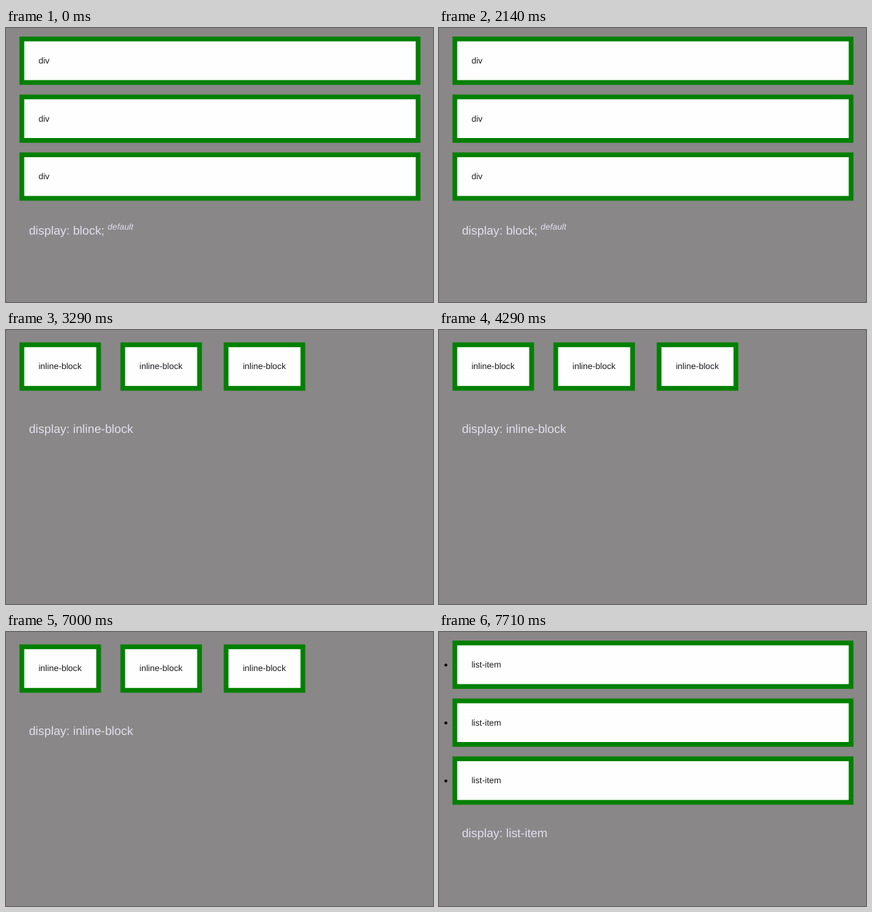
These frames come from a looping animation (600x386 px, 8000 ms). An HTML page:

```html
<!DOCTYPE html>
<html lang="en">
<head>
<meta charset="utf-8">
<title>CSS display values</title>
<style>
  html, body { margin: 0; width: 100%; height: 100%; overflow: hidden; background: #8a8788; }
  svg { display: block; width: 600px; height: 386px; }
  text {
    font: 12.1px "Liberation Sans", Arial, sans-serif;
    fill: #1c1c1e;
    text-rendering: geometricPrecision;
  }
  .box { fill: #fffeff; stroke: #008000; stroke-width: 6.7px; }
  .label { font-size: 16.9px; fill: #e3dfee; }
  .sup { font-size: 12px; font-style: italic; fill: #e3dfee; }

  .scene { visibility: hidden; animation: 8s step-end infinite; }
  #block { animation-name: block; }
  #inline { animation-name: inline; }
  #list { animation-name: list; }
  @keyframes block { 0% { visibility: visible } 30.375%, 100% { visibility: hidden } }
  @keyframes inline { 0% { visibility: hidden } 30.375% { visibility: visible } 91.125%, 100% { visibility: hidden } }
  @keyframes list { 0% { visibility: hidden } 91.125%, 100% { visibility: visible } }
</style>
</head>
<body>
<svg viewBox="0 0 600 386">
  <defs>
    <rect id="wide" class="box" x="22.25" y="15.45" width="556.8" height="61.3"/>
    <rect id="small" class="box" x="22.25" y="20.85" width="107.9" height="61.3"/>
    <g id="row"><use href="#wide"/><text x="45.7" y="50">div</text></g>
    <g id="cell"><use href="#small"/><text x="45.7" y="55.3">inline-block</text></g>
    <g id="item">
      <circle cx="9.6" cy="46.6" r="2.1"/>
      <use href="#wide"/><text x="45.7" y="50">list-item</text>
    </g>
  </defs>

  <g id="block" class="scene">
    <use href="#row"/>
    <use href="#row" y="81.6"/>
    <use href="#row" y="163.2"/>
    <text class="label" x="32.2" y="290.5">display: block;</text>
    <text class="sup" x="142.8" y="284.3">default</text>
  </g>

  <g id="inline" class="scene">
    <use href="#cell"/>
    <use href="#cell" x="141.8"/>
    <use href="#cell" x="287"/>
    <text class="label" x="32.2" y="145">display: inline-block</text>
  </g>

  <g id="list" class="scene">
    <use href="#item"/>
    <use href="#item" y="81.6"/>
    <use href="#item" y="163.2"/>
    <text class="label" x="32.2" y="289">display: list-item</text>
  </g>
</svg>
</body>
</html>
```
